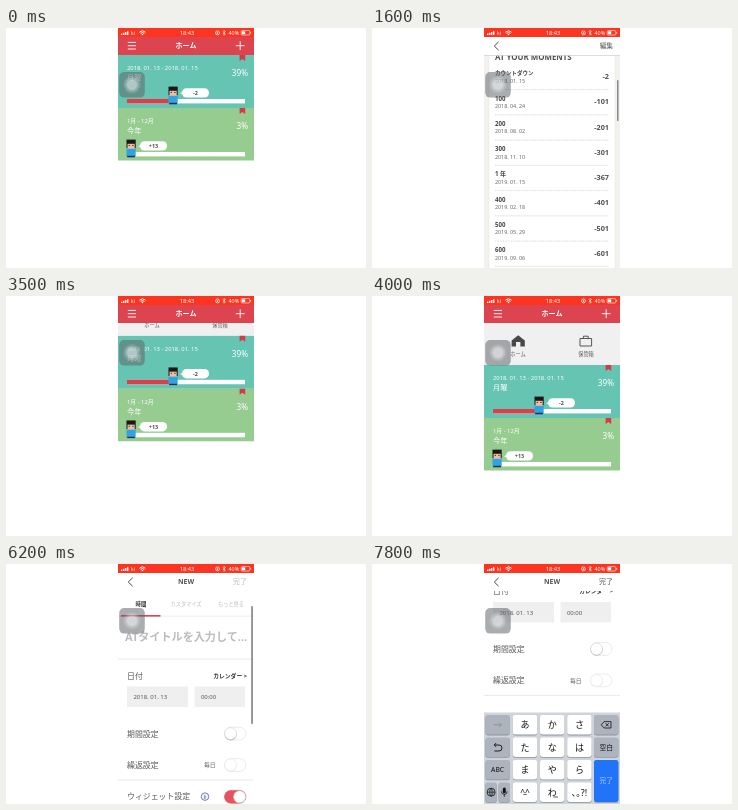
Animation, 360 px wide and 240 px high, one loop 8000 ms. Source, as an HTML page:

```html
<!DOCTYPE html>
<html lang="ja">
<head>
<meta charset="utf-8">
<style>
html, body { margin: 0; width: 100%; height: 100%; overflow: hidden; background: #fff; }
svg { display: block; width: 100vw; height: 100vh; }
text { font-family: "Noto Sans", "Noto Sans CJK JP", "Noto Sans CJK", sans-serif; white-space: pre; }
</style>
</head>
<body>
<svg id="stage" viewBox="0 0 360 240"></svg>
<script>
const LOOP = 8000, STEP = 100;
const RED = '#dc4450', INK = '#5a5a5c', GREY = '#bcbcbe';

// Markup helpers
const rect = (x, y, w, h, fill, rx = 0, extra = '') =>
  `<rect x="${x}" y="${y}" width="${w}" height="${h}" rx="${rx}" fill="${fill}" ${extra}/>`;
const path = (d, stroke, w = 1, fill = 'none', extra = '') =>
  `<path d="${d}" stroke="${stroke}" stroke-width="${w}" fill="${fill}" ${extra}/>`;
const circle = (x, y, r, fill, extra = '') => `<circle cx="${x}" cy="${y}" r="${r}" fill="${fill}" ${extra}/>`;
const text = (x, y, s, size, fill = INK, weight = 400, anchor = 'start', extra = '') =>
  `<text x="${x}" y="${y}" font-size="${size}" fill="${fill}" font-weight="${weight}" text-anchor="${anchor}" ${extra}>${s}</text>`;
const group = (id, body, extra = '') => `<g id="${id}" ${extra}>${body}</g>`;
const rule = (y, x1 = 112, x2 = 248) => path(`M${x1} ${y}H${x2}`, '#c4c4c4', .6, 'none', 'stroke-dasharray="1 .6"');

function statusBar() {
  let s = rect(112, 0, 136, 9, '#fc3420');
  for (let i = 0; i < 4; i++) s += rect(115 + i * 2, 5.6 - i * .8, 1.4, 1.4 + i * .8, '#fff', .3);
  s += text(125, 7, 'ki', 5, '#fff');
  s += path('M133.4 4.2Q136.5 1.4 139.6 4.2M134.6 5.4Q136.5 3.8 138.4 5.4', '#fff', 1);
  s += circle(136.5, 6.5, .8, '#fff');
  s += text(181, 7.1, '18:43', 5.7, '#fff', 500, 'middle');
  s += circle(211.5, 4.9, 2, 'none', 'stroke="#fff" stroke-width=".7"') + rect(210.8, 4.3, 1.4, 1.4, '#fff');
  s += path('M216.8 3.4L219.4 6L218.1 7.3V2.3L219.4 3.6L216.8 6.2', '#fff', .6);
  s += text(222.5, 7, '40%', 5.4, '#fff');
  s += rect(235.2, 2.6, 8.6, 4.4, 'none', 1, 'stroke="#fff" stroke-width=".6"');
  return s + rect(236, 3.4, 3.2, 2.8, '#fff') + rect(244.3, 4, .8, 1.6, '#fff');
}

function figure(x, y) {
  return rect(x, y, 9.2, 8.6, '#1b1718') + rect(x + 1, y + 4.2, 7.2, 5.4, '#edbf9e') +
    rect(x + 2.2, y + 5.3, 1.1, 1.1, '#2a2020') + rect(x + 5.9, y + 5.3, 1.1, 1.1, '#2a2020') +
    rect(x, y + 9.2, 9.2, 7.2, '#2fa4e4') + rect(x + .6, y + 16.2, 8, 1.5, '#24304c');
}

function bubble(x, y, w, label, border = 'none', weight = 700) {
  return path(`M${x + 2} ${y + 3.2}L${x - 2.2} ${y + 5}L${x + 2} ${y + 6.4}`, 'none', 0, '#fff') +
    rect(x, y, w, 9.4, '#fff', 4.5, `stroke="${border}" stroke-width=".6"`) +
    text(x + w / 2, y + 6.8, label, 5.4, '#4c4c4e', weight, 'middle');
}

function homeCard(y, fill, dates, title, pct, done, label) {
  return rect(112, y, 136, 53, fill) +
    path(`M233.6 ${y}h5.6v6l-2.8 -2l-2.8 2z`, 'none', 0, '#d63a48') +
    text(121, y + 15.2, dates, 5.85, '#fff') + text(121, y + 25, title, 7.2, '#fff', 300) +
    text(242, y + 21, pct, 8.2, '#fff', 300, 'end') +
    rect(121, y + 44, 118, 4.4, '#fff') + rect(121, y + 44, done, 4.4, '#db3f4b') +
    figure(120.5 + done, y + 31.6) + bubble(134 + done, y + 33.2, 27, label);
}

function home() {
  const list = rect(112, 27, 136, 220, '#fff') +
    homeCard(27, '#66c4b2', '2018. 01. 13 - 2018. 01. 15', '月曜', '39%', 42, '-2') +
    homeCard(80, '#97cc91', '1月 - 12月', '今年', '3%', 0, '+13') + rect(112, 132.5, 136, 50, '#fff');
  const menu = rect(112, -15, 136, 42, '#f1f0f1') +
    path('M139.6 2.6L146.2 -2.8L152.8 2.6V8.6H148.4V4H144V8.6H139.6z', 'none', 0, '#4a4748') +
    text(146, 18, 'ホーム', 5.2, INK, 400, 'middle') +
    path('M208 0.5H219.6V8H208zM211.4 .5V-1.8H216.2V.5', '#555', 1) +
    text(214, 18, '保管箱', 5.2, INK, 400, 'middle');
  return group('homeList', menu + list) + rect(112, 0, 136, 27, RED) +
    path('M121.8 14.4H130M121.8 17.7H130M121.8 21H130', '#fff', .9) +
    text(180, 20, 'ホーム', 7, '#fff', 700, 'middle') +
    path('M229.8 17.7H238.6M234.2 13.3V22.1', '#fff', .9, 'none', 'id="plus"');
}

const back = path('M126.6 13.8L122.3 18L126.6 22.2', '#333', .9);

function moments() {
  const day = 864e5, start = Date.UTC(2018, 0, 15);
  const items = [['カウントダウン', 0], ...[1, 2, 3].map(n => [n * 100, n * 100 - 1]), ['1 年', 365]];
  for (let n = 4; n < 15; n++) {
    items.push([n * 100, n * 100 - 1]);
    if (n === 7) items.push(['2 年', 730]);
    if (n === 10) items.push(['3 年', 1096]);
  }
  return items.map(([name, days], i) => {
    const y = 166 + i * 25.25;
    const date = new Date(start + days * day).toISOString().slice(0, 10).replace(/-/g, '. ');
    return text(123, y + 2, name, i ? 6.1 : 5.5, '#444', 600) + text(123, y + 9.6, date, 5.35, '#666') +
      text(237, y + 5.8, -(days + 2), 7.3, '#505050', 600, 'end') + rule(y + 16.2, 123, 237);
  }).join('');
}

function detail() {
  const body = text(180, 43, '2018. 01. 13 - 2018. 01. 15', 5.3, '#555', 400, 'middle') +
    text(180.5, 58, '月曜', 10.6, '#444', 600, 'middle') +
    text(180.5, 90, '39%', 31, '#333', 300, 'middle', 'style="font-family:\'Open Sans\',sans-serif"') +
    rect(123, 110.5, 114, 4.4, '#dcdcde', 2) + rect(123, 110.5, 42, 4.4, '#db3f4b', 2) +
    figure(162.8, 97.2) + bubble(177.5, 98, 28.5, '-2', '#e4e4e4', 500) +
    rect(112, 130.5, 136, 600, '#f2f1ee') + rect(117, 136.5, 126, 600, '#fff', 1, 'stroke="#e6e5e2" stroke-width=".5"') +
    text(123, 152.2, 'AT YOUR MOMENTS', 7.9, '#505050', 600) + moments() +
    circle(225.5, 134.8, 11.8, '#3579f3') +
    path('M223.4 131.8H221.6V138.8H229.4V131.8H227.6M225.5 136.6V130.4M223.8 132L225.5 130.2L227.2 132M223.4 136.6H227.6', '#fff', .9);
  return rect(112, 0, 136, 240, '#fff') + group('detailBody', body) +
    group('detailBar', rect(245, 28, 1.5, 41, '#888', .7)) +
    rect(112, 0, 136, 27, '#fff') + group('shade', rect(112, 27, 136, .8, '#d5d5d5')) +
    back + text(241, 20.2, '編集', 6.7, '#555', 400, 'end');
}

function toggle(y, on, faint) {
  const cx = on ? 233.6 : 224.6;
  return rect(218.5, y - 6.4, 21.4, 12.8, on ? '#e5535c' : '#fff', 6.4, `stroke="${on ? '#e5535c' : '#e2e2e2'}" stroke-width=".7"`) +
    circle(cx, y + .8, 6, faint ? '#e8e8e8' : '#bbb') +
    circle(cx, y, 6, '#fff', `stroke="${faint ? '#e2e2e2' : '#c6c6c6'}" stroke-width=".5"`);
}

function form() {
  const field = (x, w, s) => rect(x, 122.5, w, 20.5, '#efefef') + text(x + 6.4, 135.2, s, 6, '#555');
  const widget = text(121, 235.4, 'ウィジェット設定', 7.9) + toggle(232.8, true) +
    circle(199, 232.6, 3.8, '#eef1fb', 'stroke="#5566b8" stroke-width=".8"') +
    text(199, 234.9, 'i', 6, '#4456b0', 700, 'middle') + rule(247);
  const body = text(135, 42, '時間', 5.4, '#333', 600, 'middle') +
    text(180, 42, 'カスタマイズ', 5.2, GREY, 500, 'middle') + text(225, 42, 'もっと見る', 5.2, GREY, 500, 'middle') +
    rect(112, 51.8, 136, .6, '#e2e2e2') + rect(115, 51, 39.5, 1.6, RED) +
    text(119, 77.4, 'ATタイトルを入力して…', 11.1, GREY, 600, 'start', 'id="hint"') +
    group('typed', rect(118.5, 66.5, 12.5, 13.5, '#a9c8ee', 0, 'id="mark"') + text(119, 77.4, 'れ', 11.4, '#333', 600)) +
    rule(95) + text(121, 114.8, '日付', 7.9) + text(241, 114, 'カレンダー &gt;', 5.8, '#333', 600, 'end') +
    field(121, 61, '2018. 01. 13') + field(188.5, 50.5, '00:00') +
    text(121, 172.6, '期間設定', 7.9) + toggle(169.6, false) +
    text(121, 204, '繰返設定', 7.9) + text(198, 203.4, '毎日', 5.8) + toggle(201, false, true) + rule(216) +
    group('widget', widget);
  return rect(112, 0, 136, 240, '#fff') + group('formBody', body) +
    rect(245.3, 42, 1.5, 118, '#777', .7, 'id="formBar"') + rect(112, 0, 136, 27, '#fff') +
    back + text(180, 20, 'NEW', 6.9, '#555', 600, 'middle') + text(241, 20.2, '完了', 7, GREY, 400, 'end', 'id="done"') +
    group('keys', keyboard());
}

function keyboard() {
  const xs = [113.4, 140.8, 168, 195.2, 222], ys = [151, 173.4, 195.9, 218.4];
  const key = (c, r, s, size = 9, fill = '#fff', h = 19.6, w = 24.4, id = '') =>
    rect(xs[c], ys[r] + .8, w, h, '#8d939b', 2.4) + rect(xs[c], ys[r], w, h, fill, 2.4, id && `id="${id}"`) +
    text(xs[c] + w / 2, ys[r] + h / 2 + size * .37, s, size, '#111', 400, 'middle', id && `id="${id}Label"`);
  const dark = '#adb4be';
  let s = rect(112, 148.5, 136, 92, '#cfd4da');
  ['あかさ', 'たなは', 'まやら'].forEach((row, r) => [...row].forEach((k, c) => s += key(c + 1, r, k)));
  s += key(1, 3, '', 7) + key(2, 3, 'わ', 9, '#fff', 19.6, 24.4, 'wa') + key(3, 3, '､｡?!', 9);
  s += group('small', text(153, 227, '゛゜', 6, '#111', 400, 'middle') + text(153, 233.6, '小', 6, '#111', 400, 'middle'));
  s += group('smile', text(153, 231.4, '^^', 8.4, '#111', 400, 'middle') + path('M151.4 230.4H154.6', '#111', .7));
  s += path('M181.5 233H186', '#111', .7);
  s += key(0, 0, '', 8, dark) + path('M121.6 160.8H129.4M127.2 158.6L129.4 160.8L127.2 163', '#8a9099', .9);
  s += key(0, 1, '', 8, dark) + path('M122.2 181H127A3 3 0 0 1 127 187H122.4M124.2 179L122.2 181L124.2 183', '#111', .9);
  s += key(0, 2, 'ABC', 6.8, dark) + key(0, 3, '', 8, dark, 19.6, 11.4);
  s += circle(119.1, 228.2, 4, 'none', 'stroke="#111" stroke-width=".8"') +
    path('M115.1 228.2H123.1M119.1 224.2V232.2M119.1 224.2Q115.3 228.2 119.1 232.2Q122.9 228.2 119.1 224.2', '#111', .6);
  s += rect(126.6, 219.2, 11.4, 19.6, '#8d939b', 2.4) + rect(126.6, 218.4, 11.4, 19.6, dark, 2.4) +
    rect(130.8, 223.4, 3, 5.8, '#111', 1.5) + path('M129.4 227.4Q129.6 230.4 132.3 230.4Q135 230.4 135.2 227.4M132.3 230.4V232.8', '#111', .8);
  s += key(4, 0, '', 8, dark) + path('M229.2 160.8L232.2 157.6H239V164H232.2zM233.6 159.2L236.8 162.4M236.8 159.2L233.6 162.4', '#111', .8);
  return s + key(4, 1, '空白', 6.8, dark) + key(4, 2, '確定', 6.8, dark, 42.1, 24.4, 'enter');
}

const touch = rect(113.2, 44, 25.6, 25.6, 'rgb(92,97,102)', 5, 'fill-opacity=".52"') +
  [[8.8, .12], [7, .2], [5.2, .3]].map(([r, o]) => circle(126, 56.8, r, '#fff', `fill-opacity="${o}"`)).join('');

stage.innerHTML = '<clipPath id="phone"><rect x="112" width="136" height="240"/></clipPath><rect width="360" height="240" fill="#fff"/>' +
  group('screen', group('home', home()) + group('detail', detail()) + group('form', form()) + touch + statusBar(),
    'clip-path="url(#phone)"');

// Motion helpers
const $ = id => document.getElementById(id);
const clamp = v => Math.min(1, Math.max(0, v));
const ease = (t, a, b) => 1 - (1 - clamp((t - a) / (b - a))) ** 2;
const move = (id, x, y) => $(id).setAttribute('transform', `translate(${x} ${y})`);
const show = (id, on) => $(id).setAttribute('opacity', +on);
function track(t, keys) {
  const i = keys.findIndex(k => k[0] > t);
  if (i === 0) return keys[0][1];
  if (i < 0) return keys[keys.length - 1][1];
  const [a, u] = keys[i - 1], [b, v] = keys[i];
  return u + (v - u) * (t - a) / (b - a);
}

const listKeys = [[1100, 0], [1300, 28], [1600, 120.6], [1800, 185], [2000, 210], [2200, 150], [2500, 30], [2700, 0]];

function draw(now) {
  const t = Math.floor(now % LOOP / STEP) * STEP;
  const toDetail = ease(t, 700, 1000) * (1 - ease(t, 3000, 3200));
  const toForm = ease(t, 5700, 6000);
  move('home', -40 * Math.max(toDetail, toForm), 0);
  move('detail', 136 * (1 - toDetail), 0);
  move('form', 136 * (1 - toForm), 0);
  move('homeList', 0, 42 * ease(t, 3400, 4000));
  show('plus', t >= 5600 ? .4 : 1);

  const y = track(t, listKeys);
  move('detailBody', 0, -y);
  move('detailBar', 0, y * .2);
  show('detailBar', t >= 1200 && t < 2700);
  show('shade', y > 1);

  const typed = t >= 7000, fixed = t >= 7300;
  const up = ease(t, 6400, 6800);
  move('formBody', 0, -25.6 * up - 59 * ease(t, 7400, 7800));
  move('keys', 0, 93 * (1 - up));
  show('formBar', t < 6500 ? 1 - clamp((t - 6200) / 300) : 0);
  show('widget', up < 1);
  show('hint', !typed);
  show('typed', typed);
  show('mark', !fixed);
  $('done').setAttribute('fill', typed ? '#555' : GREY);
  $('wa').setAttribute('fill', t >= 7000 && t < 7200 ? '#adb4be' : '#fff');
  show('small', typed && !fixed);
  show('smile', !typed || fixed);
  const ready = fixed || !typed;
  $('enter').setAttribute('fill', ready ? '#2173f8' : '#adb4be');
  $('enterLabel').setAttribute('fill', ready ? '#a9ccff' : '#111');
  $('enterLabel').textContent = ready ? '完了' : '確定';
}

const began = performance.now();
function tick() {
  draw(performance.now() - began);
  requestAnimationFrame(tick);
}
tick();
</script>
</body>
</html>
```
